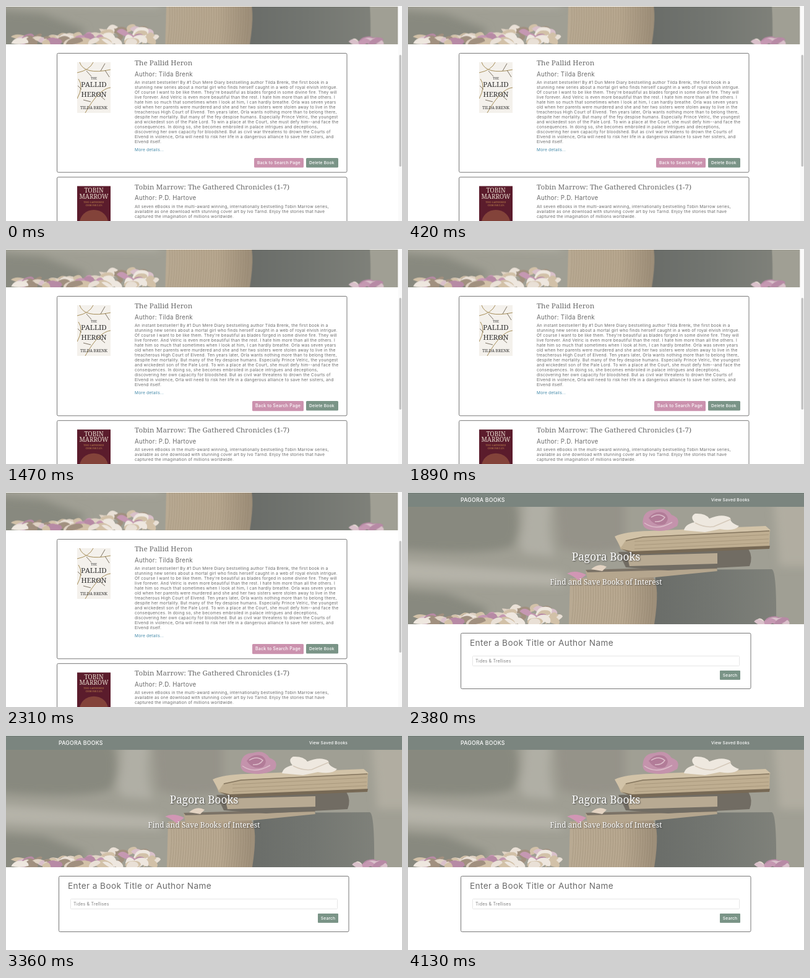
Write an HTML page that moves like this. It is 640 by 348 pixels and loops after 4200 ms.

```html
<!DOCTYPE html>
<html lang="en">
<head>
<meta charset="utf-8">
<title>Book finder</title>
<style>
  html, body { margin: 0; width: 100%; height: 100%; overflow: hidden; background: #fff; }
  svg { display: block; width: 100vw; height: 100vh; }
  text { font-family: Inter, "Open Sans", sans-serif; letter-spacing: .03em; fill: #6a6a6a; white-space: pre; }
  .serif { font-family: "Noto Serif", serif; letter-spacing: 0; }
  .title { font-size: 11.6px; font-weight: 300; }
  .author { font-size: 9.75px; }
  .body { font-size: 6.75px; }
  .button { font-size: 6.7px; font-weight: 500; fill: #fff; }
  .hero-text { fill: #fff; text-anchor: middle; text-shadow: 1px 1px 2px #333b; }
  .cover { text-anchor: middle; letter-spacing: 0; fill: #333; }
  .cream { fill: #e6d9cc; }
  .gold { fill: #c0874f; }
  .card { fill: #fff; stroke: #777; }
</style>
</head>
<body>
<svg viewBox="0 0 640 348">
  <defs>
    <clipPath id="heroClip"><rect y="24" width="640" height="190"/></clipPath>
    <clipPath id="viewClip"><rect y="1" width="634" height="347"/></clipPath>
    <clipPath id="coverClip"><rect x="115" y="91" width="54" height="82"/></clipPath>
    <filter id="blur" x="-20%" y="-20%" width="140%" height="140%"><feGaussianBlur stdDeviation="7"/></filter>
    <filter id="soft"><feGaussianBlur stdDeviation=".6"/></filter>
    <linearGradient id="pages">
      <stop stop-color="#b9aa93"/><stop offset=".6" stop-color="#b8a890"/><stop offset="1" stop-color="#9c8d78"/>
    </linearGradient>
    <linearGradient id="slate">
      <stop stop-color="#6a6d69"/><stop offset=".5" stop-color="#737671"/><stop offset="1" stop-color="#7f817a"/>
    </linearGradient>

    <g id="hero" clip-path="url(#heroClip)">
      <rect y="24" width="640" height="190" fill="#a09f94"/>
      <g filter="url(#blur)">
        <path d="M-20 10H172Q186 60 168 88Q130 104 -20 92Z" fill="#88897f"/>
        <path d="M190 10H232Q222 70 238 104L190 100Q176 92 186 60Z" fill="#b0afa5"/>
        <path d="M238 10H350V92Q290 104 246 88Z" fill="#959389"/>
        <path d="M-20 112Q120 122 250 132V152Q100 150 -20 142Z" fill="#b5b3a9"/>
        <path d="M-20 158L60 164L130 190L100 230H-20Z" fill="#88897f"/>
        <path d="M590 10H660V120H600Z" fill="#b1ada1"/>
      </g>
      <g filter="url(#soft)">
        <path d="M400 134Q408 126 430 126L588 125Q596 128 595 214H396Z" fill="url(#slate)"/>
        <path d="M262 140L395 136Q408 150 398 214H260Z" fill="url(#pages)"/>
        <g id="leaves" fill="none" stroke="#86765f" stroke-width=".8" opacity=".35"></g>
        <path d="M287 127L498 121L500 128L400 138L290 141Z" fill="#b5a68e"/>
        <path d="M287 126L498 120L500 124L290 130Z" fill="#7b7266"/>
        <path d="M340 97L550 92Q558 105 552 120L420 127L352 122Z" fill="#716c63"/>
        <path d="M354 103L500 99V116L358 120Z" fill="#b8aa93"/>
        <path d="M336 73Q345 66 375 66L576 56L585 61L584 89L365 99L344 93Z" fill="#bfae91"/>
        <path d="M334 72Q350 64 390 63L578 55L586 62L380 72L352 78L344 90Z" fill="#d2c3a8"/>
        <path d="M344 92L362 96L585 87L584 92L366 101Z" fill="#776955"/>
        <path d="M352 79L380 73L584 63" stroke="#85765f" stroke-width="1.500" fill="none"/>
        <path d="M366 80L583 69M366 86L583 76M366 92L583 82" stroke="#9a8a70" stroke-width=".6" fill="none"/>
        <path d="M446 62Q448 52 463 49Q455 40 464 35Q481 34 487 43Q508 34 521 42Q520 50 535 55Q528 64 504 60L480 65Z" fill="#eee8df"/>
        <path d="M464 50Q480 58 494 56L522 44" stroke="#d5c9ba" stroke-width="1.500" fill="none"/>
        <g transform="translate(407 46)">
          <path d="M-27 -2Q-25 -16 -8 -17Q10 -23 19 -9Q34 -4 28 9Q10 20 -10 16Q-31 15 -27 -2Z" fill="#c493ac"/>
          <path d="M-18 -4Q-8 -17 7 -12Q18 -4 8 6Q-8 11 -18 -4Z" fill="#b27c98"/>
          <path d="M-14 -5Q-2 -13 8 -5Q3 3 -8 2M-25 4Q-6 18 20 3" stroke="#dcbdca" stroke-width="1.500" fill="none"/>
        </g>
        <path d="M257 132Q270 125 288 134L276 143Q266 135 257 132Z" fill="#d196b4"/>
        <path d="M296 125Q308 114 321 121L314 128Z" fill="#e3d3c2"/>
        <g id="petals"></g>
      </g>
    </g>
  </defs>

  <rect width="640" height="348" fill="#fff"/>

  <g id="saved">
    <g clip-path="url(#viewClip)">
      <use href="#hero" transform="translate(0 -149.9) scale(.99)"/>
    </g>
    <rect id="firstCard" class="card" x="82.5" y="76.5" width="468.5" height="192.7" rx="2"/>
    <rect x="115" y="91" width="54" height="82" fill="#f4f1ec"/>
    <g clip-path="url(#coverClip)" fill="none" stroke="#a58d58">
      <path d="M115 108Q135 104 141 91M119 91Q126 112 169 103M169 132Q150 134 128 173M115 150Q126 130 117 118"/>
      <path d="M130 105L138 114M153 105L160 93M160 104L167 115M146 140L160 152M122 135L116 129M137 155L125 152" stroke="#5d5240" stroke-width=".8"/>
    </g>
    <text class="serif cover" x="142" y="119" font-size="5">THE</text>
    <text class="serif cover" x="142" y="131" font-size="11.5">PALLID</text>
    <text class="serif cover" x="142" y="147" font-size="11.5">HERON</text>
    <text class="serif cover" x="142" y="166.500" font-size="6.6">TILDA BRENK</text>
    <text class="serif title" x="208" y="96.300">The Pallid Heron</text>
    <text class="author" x="208" y="113.700">Author: Tilda Brenk</text>
    <g id="firstBlurb"></g>
    <text x="208" y="234.500" font-size="6.6" style="fill:#4288a8">More details...</text>
    <rect id="backBox" y="246" rx="1.500" fill="#cb92ae"/>
    <text id="backLabel" class="button" y="256.300">Back to Search Page</text>
    <rect x="485" y="246" width="52" height="15.600" rx="1.500" fill="#7a9487"/>
    <text class="button" x="490" y="256.300">Delete Book</text>

    <g id="secondCard">
      <rect class="card" x="82.5" y="277" width="468.5" height="90" rx="2"/>
      <rect x="115" y="291.500" width="54" height="82" fill="#5b1c2c"/>
      <text class="serif cover cream" x="142" y="302" font-size="10">TOBIN</text>
      <text class="serif cover cream" x="142" y="311.500" font-size="10">MARROW</text>
      <text class="serif cover gold" x="142" y="318.500" font-size="4.3">THE GATHERED</text>
      <text class="serif cover gold" x="142" y="323.500" font-size="4.3">CHRONICLES</text>
      <ellipse cx="142" cy="351" rx="23" ry="21" fill="#83433a"/>
      <text class="serif title" x="208" y="296.800">Tobin Marrow: The Gathered Chronicles (1-7)</text>
      <text class="author" x="208" y="314">Author: P.D. Hartove</text>
      <g id="secondBlurb"></g>
    </g>
    <rect x="634" width="6" height="348" fill="#fafafa"/>
    <rect x="635.5" y="79" width="3.500" height="181" rx="1.750" fill="#c3c3c3"/>
  </g>

  <g id="home">
    <rect y="1" width="640" height="23.500" fill="#7b857f"/>
    <text x="85" y="15.700" font-size="8.7" font-weight="500" style="fill:#fff">PAGORA BOOKS</text>
    <text class="button" x="490" y="15.200">View Saved Books</text>
    <use href="#hero"/>
    <text class="serif hero-text" x="320" y="111.300" font-size="17.3">Pagora Books</text>
    <text class="serif hero-text" x="320" y="150.300" font-size="12.05">Find and Save Books of Interest</text>
    <rect class="card" x="85.5" y="228.500" width="468.5" height="90" rx="2"/>
    <text x="100" y="249" font-size="13.6">Enter a Book Title or Author Name</text>
    <rect x="104.5" y="265.500" width="431" height="16" rx="1" fill="#fff" stroke="#e6e6e6"/>
    <text x="109" y="275.900" font-size="7" style="fill:#808080">Tides &amp; Trellises</text>
    <rect x="504" y="289" width="33" height="15" rx="1" fill="#7a9487"/>
    <text class="button" x="508.7" y="298.900">Search</text>
  </g>
</svg>
<script>
const LOOP = 4200, HOVER_AT = 1190, HOME_AT = 2380;
const byId = id => document.getElementById(id);

function add(parent, tag, attributes, content = '') {
  const node = document.createElementNS('http://www.w3.org/2000/svg', tag);
  for (const name in attributes) node.setAttribute(name, attributes[name]);
  node.textContent = content;
  byId(parent).append(node);
}

function addLines(parent, top, lines) {
  lines.forEach((line, i) => add(parent, 'text', { class: 'body', x: 208, y: top + i * 8 }, line));
}

addLines('firstBlurb', 126, [
  'An instant bestseller! By #1 Dun Mere Diary bestselling author Tilda Brenk, the first book in a',
  'stunning new series about a mortal girl who finds herself caught in a web of royal elvish intrigue.',
  "Of course I want to be like them. They're beautiful as blades forged in some divine fire. They will",
  'live forever. And Velric is even more beautiful than the rest. I hate him more than all the others. I',
  'hate him so much that sometimes when I look at him, I can hardly breathe. Orla was seven years',
  'old when her parents were murdered and she and her two sisters were stolen away to live in the',
  'treacherous High Court of Elvend. Ten years later, Orla wants nothing more than to belong there,',
  'despite her mortality. But many of the fey despise humans. Especially Prince Velric, the youngest',
  'and wickedest son of the Pale Lord. To win a place at the Court, she must defy him--and face the',
  'consequences. In doing so, she becomes embroiled in palace intrigues and deceptions,',
  'discovering her own capacity for bloodshed. But as civil war threatens to drown the Courts of',
  'Elvend in violence, Orla will need to risk her life in a dangerous alliance to save her sisters, and',
  'Elvend itself.'
]);
addLines('secondBlurb', 326.5, [
  'All seven eBooks in the multi-award winning, internationally bestselling Tobin Marrow series,',
  'available as one download with stunning cover art by Ivo Tarnd. Enjoy the stories that have',
  'captured the imagination of millions worldwide.'
]);

// Seeded random numbers keep the petals the same on every load.
let seed = 7;
const random = () => (seed = seed * 16807 % 2147483647) / 2147483647;
const petalColors = ['#e9e0d6', '#dfd2c4', '#c598b2', '#b78aa5', '#d9c0ca', '#d2c1a8', '#eee7df', '#a1907f'];

function scatterPetals(count, left, width, height) {
  for (let i = 0; i < count; i++) {
    const x = left + random() * width;
    const y = 213 - (1 - i / count) * height(x);
    const w = 7 + random() * 8, h = 4 + random() * 4, bend = (random() - 0.5) * h;
    add('petals', 'path', {
      d: `M${-w} ${bend}Q${-w / 2} ${-h * 1.5} ${w * 0.3} ${-h}Q${w * 1.2} ${-h / 2} ${w} ${h / 2}Q0 ${h + bend} ${-w} ${bend}Z`,
      fill: petalColors[Math.floor(random() * petalColors.length)],
      transform: `translate(${x} ${y}) rotate(${random() * 90 - 45})`
    });
  }
}
scatterPetals(80, 22, 222, x => 9 + 17 * Math.exp(-(((x - 195) / 55) ** 2)));
scatterPetals(9, 562, 46, () => 5);

for (let x = 266; x < 396; x += 4) {
  add('leaves', 'path', { d: `M${x} 140Q${x + 4} 170 ${x - 2} 214` });
}

function setBackButton(hovered) {
  const left = hovered ? 398 : 401;
  const box = byId('backBox'), label = byId('backLabel');
  box.setAttribute('x', left);
  box.setAttribute('width', 481 - left);
  box.setAttribute('height', hovered ? 16.2 : 15.6);
  label.setAttribute('x', left + 5);
  label.style.fontSize = hovered ? '7px' : '6.7px';
  byId('firstCard').setAttribute('height', hovered ? 193.4 : 192.7);
  byId('secondCard').setAttribute('transform', `translate(0 ${hovered ? 0.7 : 0})`);
}

function draw() {
  const time = performance.now() % LOOP;
  const atHome = time >= HOME_AT;
  byId('home').style.display = atHome ? '' : 'none';
  byId('saved').style.display = atHome ? 'none' : '';
  setBackButton(time >= HOVER_AT);
  requestAnimationFrame(draw);
}
draw();
</script>
</body>
</html>
```
